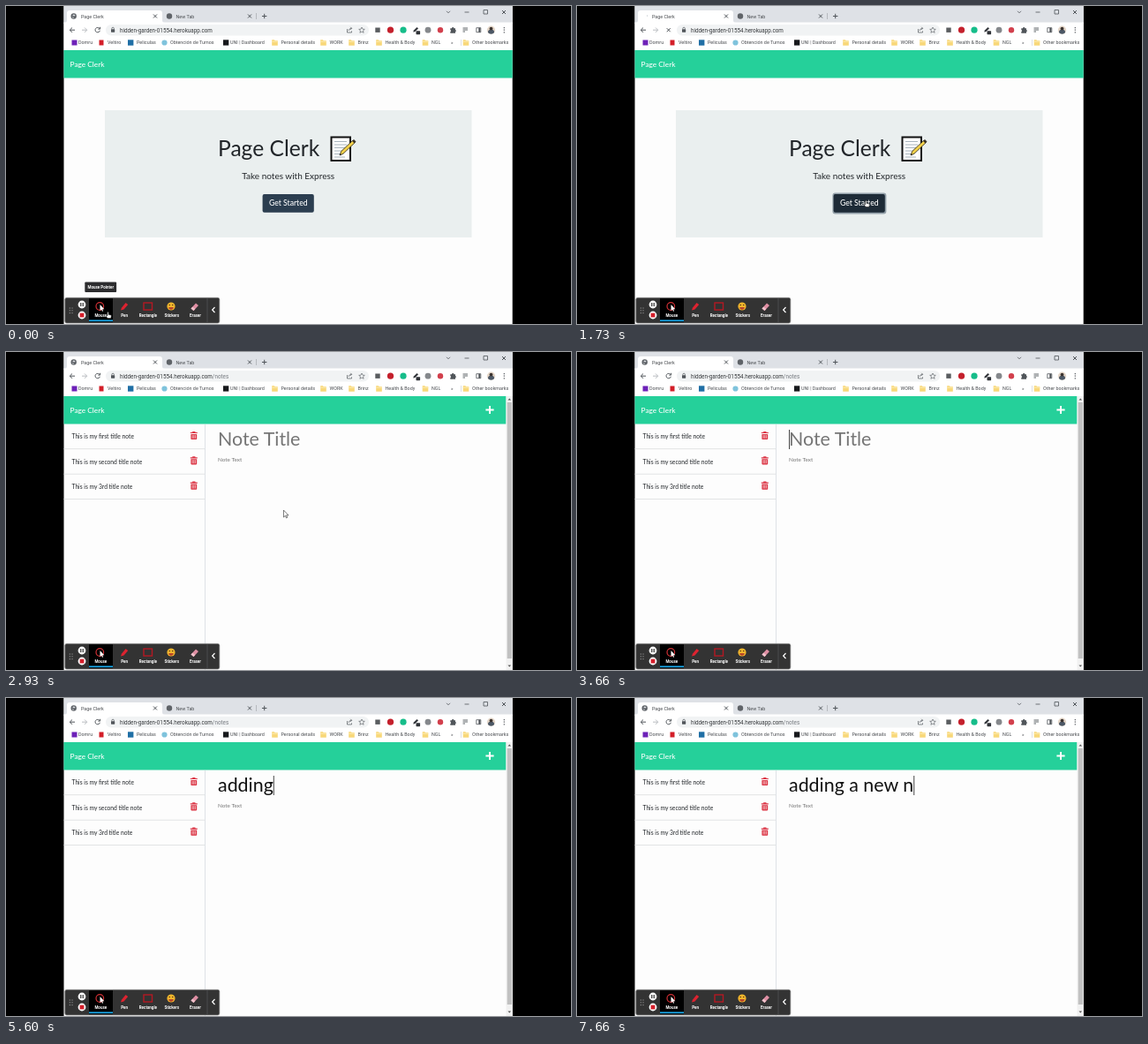
An HTML page that plays this animation: 640x360 px, repeating every 8 s.

```html
<!DOCTYPE html>
<html lang="en">
<head>
<meta charset="utf-8">
<title>Notes demo</title>
<style>
html, body { margin: 0; width: 100%; height: 100%; overflow: hidden; background: #000; }
svg { display: block; width: 640px; height: 360px; }
text { white-space: pre; }
.ui { font-family: Roboto, "Open Sans", sans-serif; font-size: 5.4px; fill: #4a4d51; }
.url { font-size: 6.3px; fill: #35383b; }
.page { font-family: Lato, sans-serif; fill: #212529; }
.label { font: bold 4.5px Roboto, sans-serif; fill: #fff; text-anchor: middle; }
.line { fill: none; stroke: #50555a; stroke-width: 1; }
</style>
</head>
<body>
<svg viewBox="0 0 640 360">
  <defs>
    <g id="folder"><path d="M-3.3-3.2h2.6l1 1h3v5.4h-6.6z" fill="#f8d879"/><path d="M-3.3-1.2h6.6" stroke="#fdeab0"/></g>
    <path id="cross" d="M-2-2 2 2M2-2-2 2" class="line"/>
    <g id="trash" fill="#dc3545">
      <path d="M-4-4h2l.6-1h2.8l.6 1h2v1.2h-8zM-3.4-2h6.8v5.4q0 .8-.8.8h-5.2q-.8 0-.8-.8z"/>
      <path d="M-1.6-1v4M0-1v4M1.6-1v4" stroke="#fdfdfd" stroke-width=".6"/>
    </g>
    <clipPath id="window"><path d="M65.5 0h508.2v360H65.5z"/></clipPath>
  </defs>
  <rect width="640" height="360"/>
  <g clip-path="url(#window)">
  <rect x="65" width="509" height="360" fill="#fdfdfd"/>

  <!-- browser window -->
  <path d="M65 0h509v20H65z" fill="#dee1e6"/>
  <path d="M66 19q3 0 3-3V8q0-3 3-3h102q3 0 3 3v8q0 3 3 3z" fill="#fff"/>
  <path d="M65 18.5h509V50H65z" fill="#fff"/>
  <rect x="113" y="21" width="298" height="12.5" rx="6.2" fill="#f1f3f4"/>
  <g id="globe"><circle cx="76.7" cy="11.5" r="3.2" fill="#5f6368"/><path d="M75 10.2l2-.8 1.6 1-1.4 1.2zM74.8 12.2l1.8.6-.4 1.4z" fill="#dfe2e5"/></g>
  <circle id="spinner" cx="76.7" cy="11.5" r="3" fill="none"/>
  <circle cx="185" cy="11.5" r="3.2" fill="#5f6368"/>
  <g class="line">
    <path d="M283.5 8v7" stroke="#a5a9ae" stroke-width=".7"/>
    <path d="M290 11.5h5.4M292.7 8.8v5.4"/>
    <path d="M499 5.8l2 2 2-2" stroke-width=".8"/>
    <path d="M519.5 7h5M541 4.5h4.5v4.5h-4.5z" stroke-width=".8"/>
    <path d="M78 27.2h-5.6m2.6-2.7-2.7 2.7 2.7 2.7"/>
    <path d="M86 27.2h5.6m-2.6-2.7 2.7 2.7-2.7 2.7" stroke="#babdc1"/>
    <path id="reload" d="M105.8 25.3a2.7 2.7 0 1 0 .6 2.5M106.6 23.8v2.3h-2.3"/>
    <path d="M119.8 26.5v-1a1.3 1.3 0 0 1 2.6 0v1" stroke-width=".7"/>
    <path d="M386.5 26v4h5v-1.6M388 28q.5-2.7 3.5-2.7m-1.3-1.5 1.5 1.5-1.5 1.5" stroke-width=".7"/>
    <path d="M403 24l1 2.2 2.3.2-1.8 1.5.6 2.4-2.1-1.3-2.1 1.3.6-2.4-1.8-1.5 2.3-.2z" stroke-width=".6"/>
    <path d="M517.5 25h5.5M517.5 27h5.5M517.5 29h2.5" stroke-width=".9"/>
    <path d="M532.8 24.7h5v5h-5z" stroke-width=".8"/>
    <path d="M536.3 24.7v5" stroke-width="2"/>
  </g>
  <use id="stop" href="#cross" x="103.7" y="27.2"/>
  <use href="#cross" x="169" y="11.5"/><use href="#cross" x="276" y="11.5"/><use href="#cross" x="564" y="7"/>
  <rect x="119" y="26.3" width="4.2" height="3.4" rx=".4" fill="#50555a"/>
  <rect x="418.3" y="24.5" width="5.4" height="5.4" fill="#5a5d60"/>
  <circle cx="435.5" cy="27.2" r="3.6" fill="#c4202c"/>
  <circle cx="450" cy="27.2" r="3.6" fill="#16bd8a"/>
  <path d="M461.2 29.6l.7-2 3.6-3.6 1.5 1.5-3.6 3.5z" fill="#303338"/>
  <rect x="464.5" y="28.2" width="4.6" height="4" rx=".6" fill="#303338"/>
  <circle cx="478" cy="27.2" r="3.4" fill="#85888c"/>
  <circle cx="492" cy="27.2" r="3.2" fill="#d2404d"/>
  <path d="M503.3 25.3h1.7a1.2 1.2 0 0 1 2.4 0h1.6v1.6a1.2 1.2 0 0 1 0 2.3v1.5h-5.7v-1.6a1.2 1.2 0 0 0 0-2.2z" fill="#50555a"/>
  <circle cx="549.5" cy="27.2" r="4.6" fill="#e4d6c8"/>
  <path d="M545.9 30a3.6 3.6 0 0 1 7.2 0 4.6 4.6 0 0 1-7.2 0z" fill="#4c5866"/><circle cx="549.5" cy="25.6" r="1.9" fill="#3c3430"/>
  <path d="M564.3 24v7" stroke="#50555a" stroke-width="1.2" stroke-dasharray="1.2 1.4"/>
  <g class="ui" id="bar">
    <text x="85" y="13.6">Page Clerk</text><text x="192.5" y="13.6">New Tab</text>
    <text x="129" y="29.5" class="url">hidden-garden-01554.herokuapp.com<tspan id="path" fill="#777b80">/notes</tspan></text>
  </g>
  <rect x="74.5" y="38.5" width="6" height="6" fill="#6d21b8"/>
  <rect x="105.5" y="38.5" width="5" height="6" fill="#d31e28"/>
  <rect x="138" y="38.3" width="6.4" height="6.4" fill="#1f6fa5"/>
  <circle cx="179.5" cy="41.5" r="3.1" fill="#7fc3dc"/>
  <rect x="246" y="38.3" width="6.3" height="6.3" fill="#17191c"/>
  <path d="M515.5 38v7" stroke="#d0d3d7" stroke-width=".7"/>

  <!-- landing page -->
  <g id="home" class="page">
    <path d="M65 50h509v31.4H65z" fill="#25d09a"/>
    <path d="M112 118h415.5v144H112z" fill="#eaefef"/>
    <text x="240" y="170" font-size="24.6">Page Clerk</text>
    <path d="M368.5 148.5h21.5v26.5h-21.5z" fill="#fff" stroke="#111" stroke-width="2"/>
    <path d="M372 153.5h14M372 157h14M372 160.5h12M372 164h9M372 167.5h7M372 171h12" stroke="#a9b4bd"/>
    <path d="M378 169l1.6-4.4 13.2-12.4 2.4 2.5L382 167.2z" fill="#f2d04a" stroke="#26231a" stroke-width=".8"/>
    <path d="M392 152.8l2-1.9 2.5 2.6-2 1.9z" fill="#3b3226"/><path d="M378 169l.8-2 1.3 1.3z" fill="#222"/>
    <text x="319.7" y="196" font-size="10" text-anchor="middle">Take notes with Express</text>
    <rect id="ring" x="289.4" y="211.4" width="61" height="24" rx="3" fill="#93a0a9"/>
    <rect id="button" x="290.6" y="213" width="58.2" height="20.8" rx="2"/>
    <text x="319.8" y="226.4" font-size="8.6" font-weight="500" text-anchor="middle" fill="#fff">Get Started</text>
  </g>

  <!-- notes page -->
  <g id="notes" class="page">
    <path d="M65 50h501.5v31.4H65z" fill="#25d09a"/>
    <path d="M566.5 50h7.5v310h-7.5z" fill="#f1f1f1"/><path d="M567.7 57h5.2v290h-5.2z" fill="#c1c1c1"/>
    <path d="M568.5 54.5l1.8-2 1.8 2zM568.5 354.5l1.8 2 1.8-2z" fill="#505050"/>
    <path d="M225.5 82v278" stroke="#dee2e6"/>
    <g id="list">
      <path d="M543.4 65.5h9.2M548 60.9v9.2" stroke="#fff" stroke-width="2"/>
      <path d="M65 109.7h160M65 138.2h160M65 166.5h160" stroke="#dfe1e3" stroke-width=".9"/>
    </g>
    <text id="title" x="240" y="106.3" font-size="21.4"></text>
    <path id="caret" d="M.5 88v22" stroke="#333" stroke-width=".9"/>
    <text x="240" y="124.2" font-size="6.4" fill="#757575">Note Text</text>
  </g>
  <text class="page" x="72.5" y="68.6" font-size="8.3" font-weight="500" style="fill:#fff">Page Clerk</text>
  </g>

  <!-- recorder toolbar -->
  <g id="tools">
    <rect x="66.8" y="330.3" width="175" height="28.6" rx="2" fill="#333" stroke="#777" stroke-width=".7"/>
    <path d="M94 331h27v27H94z"/><path d="M94 356.2h27" stroke="#189fdd" stroke-width="1.8"/>
    <path d="M72.3 341.5v7M75 341.5v7" stroke="#aaa" stroke-width="1" stroke-dasharray="1 1.8"/>
    <circle cx="86" cy="338" r="4.4" fill="#fff"/><path d="M84.8 336v4M87.2 336v4" stroke="#222" stroke-width="1.1"/>
    <circle cx="86" cy="350" r="4.4" fill="#fff"/><rect x="83.6" y="347.6" width="4.8" height="4.8" fill="#d61f2b"/>
    <circle cx="106.3" cy="340" r="4.3" fill="none" stroke="#cf3034" stroke-width="1.2"/>
    <path d="M106.5 338v7l1.6-1.4 1 2.2 1-.5-1-2.1h2.2z" fill="#fff"/>
    <path d="M130 344.5l1-3 4.6-5.6 2.6 2.2-4.7 5.5z" fill="#dd2330"/>
    <rect x="156" y="336" width="9.5" height="8" fill="none" stroke="#b41923" stroke-width="1.4"/>
    <circle cx="187" cy="340" r="4.6" fill="#f2b62c"/><path d="M184.3 341h5.4a2.7 2.7 0 0 1-5.4 0z" fill="#b8452a"/>
    <path d="M184.6 338.5h1.4M188 338.5h1.4" stroke="#4c3214"/>
    <path d="M209.5 342.5l5.5-6 3 2.5-5.5 6z" fill="#e08fa4"/><path d="M209.5 342.5l1.8-2 3 2.5-1.8 2z" fill="#efc3cc"/>
    <path d="M228 331v27" stroke="#55575a" stroke-width=".7"/>
    <path d="M236.5 341l-2.8 3 2.8 3" fill="none" stroke="#fff" stroke-width="1.2"/>
  </g>
  <g id="tip"><rect x="89.3" y="312.5" width="35.8" height="11.5" rx="1" fill="#2c2c2e"/><text x="107.3" y="319.8" class="label">Mouse Pointer</text></g>

  <g id="mouse" fill="#fff" stroke="#222" stroke-width=".6">
    <path id="hand" d="M-1.2-3.3q.8-.8 1.4.1v2.5l2.6.6q.6.2.5 1L2.8 3.5h-3.8L-3 .8q.5-.9 1.8 0z"/>
    <path id="arrow" d="M-1-4v8l1.9-1.7 1.2 2.6 1.2-.6-1.2-2.5h2.5z"/>
    <path id="beam" d="M-1.3-4h2.6M0-4v8M-1.3 4h2.6"/>
  </g>
</svg>
<script>
const $ = id => document.getElementById(id);
const show = (id, on) => $(id).style.display = on ? '' : 'none';
const set = (id, attrs) => { for (const k in attrs) $(id).setAttribute(k, attrs[k]); };
function add(parent, tag, attrs, text = '') {
  const el = document.createElementNS('http://www.w3.org/2000/svg', tag);
  for (const k in attrs) el.setAttribute(k, attrs[k]);
  el.textContent = text;
  $(parent).append(el);
}

[['Domru', 82], ['Veltiro', 115], ['Peliculas', 148], ['Obtención de Turnos', 186], ['UNI | Dashboard', 254],
 ['Personal details', 311.5, 1], ['WORK', 366.5, 1], ['Brinz', 398.5, 1], ['Health & Body', 429.5, 1],
 ['NGL', 482, 1], ['»', 504], ['Other bookmarks', 528, 1]].forEach(([name, x, folder]) => {
  add('bar', 'text', { x, y: 43.4 }, name);
  if (folder) add('bar', 'use', { href: '#folder', x: x - 7, y: 41.5 });
});
['Mouse', 'Pen', 'Rectangle', 'Stickers', 'Eraser'].forEach((name, i) =>
  add('tools', 'text', { x: 107.3 + i * 26.8, y: 351.6, class: 'label' }, name));
['first', 'second', '3rd'].forEach((word, i) => {
  const y = 98.3 + i * 28.3;
  add('list', 'text', { x: 74.5, y, 'font-size': 6.7 }, `This is my ${word} title note`);
  add('list', 'use', { href: '#trash', x: 212.8, y: y - 3.4 });
});

const typed = 'adding a new n';
const keys = [4730, 4930, 5130, 5270, 5400, 5600, 5730, 6060, 6200, 6400, 6530, 6730, 6860, 7600];
const CLICK = 1600, OPEN = 1930, LOADED = 2530, FOCUS = 3600;

function glide(t, from, to, a, b) {
  const p = Math.min(1, Math.max(0, (t - from) / (to - from))), e = p * p * (3 - 2 * p);
  return a.map((v, i) => v + (b[i] - v) * e);
}

function draw(t) {
  const onNotes = t >= OPEN, busy = t >= CLICK && t < LOADED;
  show('home', !onNotes);
  show('notes', onNotes);
  show('path', onNotes);
  show('list', t >= LOADED);
  show('tip', t < 130);
  show('globe', !busy);
  show('reload', !busy);
  show('stop', busy);
  show('spinner', busy);
  set('spinner', {
    stroke: onNotes ? '#3f86e8' : '#d5d8dc',
    'stroke-dasharray': onNotes ? '11 7.85' : '2 16.85',
    transform: `rotate(${t * .4 % 360} 76.7 11.5)`
  });

  const hover = t >= 1200;
  show('ring', t >= CLICK);
  set('button', { fill: hover ? '#1e2b37' : '#2c3e50' });

  const count = keys.filter(k => t >= k).length;
  $('title').textContent = count ? typed.slice(0, count) : 'Note Title';
  $('title').style.fill = count ? '#111' : '#757575';
  const since = t - (count ? keys[count - 1] : FOCUS + 60);
  show('caret', t >= FOCUS && (since < 0 || since % 1070 < 535));
  const width = count && onNotes ? $('title').getComputedTextLength() : 0;
  set('caret', { transform: `translate(${240 + width})` });

  const button = [328, 224];
  const [x, y] = t < LOADED ? glide(t, 60, 1330, [116, 350], button) : glide(t, 2600, 3460, button, [290, 100]);
  const hand = t < 130 || hover && t < 2660, beam = t > 3330;
  show('mouse', t < FOCUS);
  show('hand', hand);
  show('beam', beam);
  show('arrow', !hand && !beam);
  set('mouse', { transform: `translate(${x} ${y})`, stroke: onNotes && hand ? '#999' : '#222' });
}

const start = performance.now();
function tick() {
  draw((performance.now() - start) % 8000);
  requestAnimationFrame(tick);
}
tick();
</script>
</body>
</html>
```
